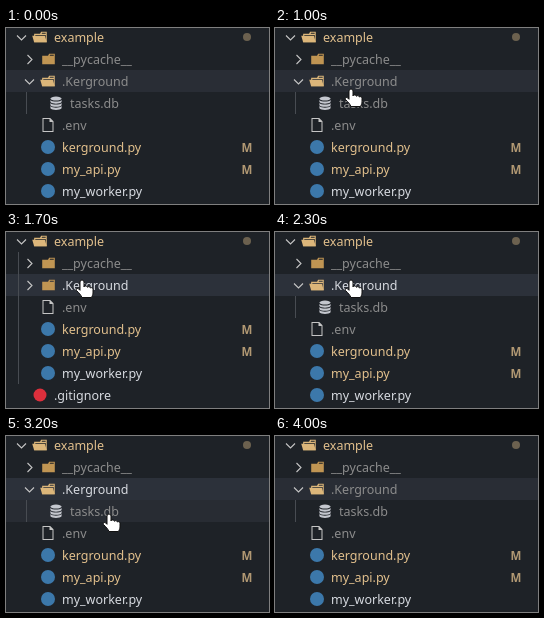
Write an HTML page that moves like this. It is 263 by 176 pixels and loops after 4.2 s.

```html
<!DOCTYPE html>
<html lang="en">
<head>
<meta charset="utf-8">
<title>File tree</title>
<style>
  html, body { margin: 0; width: 100%; height: 100%; overflow: hidden; background: #1e2227; }
  svg { display: block; width: 263px; height: 176px; }
  text { font: 12.5px "Noto Sans", "Open Sans", sans-serif; }
  .changed { fill: #e2c08d; }
  .ignored { fill: #8c8c8c; }
  .plain { fill: #d7dae0; }
  .badge { font-size: 11.5px; font-weight: 600; text-anchor: middle; opacity: .75; }
  .chevron { fill: none; stroke: #c5c5c5; stroke-width: 1.1; }
  .guide { fill: #484c52; }
</style>
</head>
<body>
<svg viewBox="0 0 263 176">
  <defs>
    <path id="right" class="chevron" d="M-1.5-4 3 .5-1.5 5"/>
    <path id="down" class="chevron" d="M-4-1.5 .5 3 5-1.5"/>
    <path id="folder" fill="#c09553" fill-rule="evenodd" transform="scale(.5)"
      d="M27.5 5.5H18.2L16.1 9.7H4.4V26.5H29.6V5.5Zm0 4.2H19.3l1.1-2.1h7.1Z"/>
    <g id="open" fill="#dcb67a" transform="scale(.5)">
      <path fill-rule="evenodd" d="M27.4 5.5H18.2L16.1 9.7H4.3V26.5H29.5V5.5Zm0 18.7H6.6V11.8H27.4Zm0-14.5H19.2l1-2.1h7.1Z"/>
      <path d="M25.7 13.7H.5L4.3 26.5H29.5Z"/>
    </g>
    <path id="file" fill="#c5c5c5" fill-rule="evenodd" transform="scale(.5)"
      d="M20.4 2H5V30H27V8.6ZM7 28V4H19v6h6V28Z"/>
    <g id="db" fill="#c4c7ce">
      <ellipse cx="8" cy="3.6" rx="5.6" ry="2"/>
      <path id="disc" d="M2.4 4.9C4 7 12 7 13.6 4.9V7.1C12 9.3 4 9.3 2.4 7.1Z"/>
      <use href="#disc" y="3.1"/>
      <use href="#disc" y="6.2"/>
    </g>
    <circle id="python" cx="8" cy="8" r="7" fill="#3c78aa"/>
    <circle id="git" cx="8" cy="8" r="6.5" fill="#dd2f3c"/>
  </defs>

  <rect id="selected" y="42" width="263" height="22"/>
  <rect id="hover" width="263" height="22" fill="#282c33"/>
  <rect id="outer" class="guide" x="12" y="20" width="1" height="132"/>
  <g id="top"></g>
  <g id="child"><rect class="guide" x="20" y="64" width="1" height="22"/></g>
  <g id="rest"></g>
  <circle cx="241" cy="9" r="4" fill="#e2c08d" opacity=".4"/>
  <path id="hand" fill="#fff" stroke="#111" stroke-linejoin="round"
    d="M-2 2a2 2 0 0 1 4 0V7c0-1.5 3-1.5 3.4.3.8-1.2 2.8-.8 3 .7 1-.8 2.6-.2 2.6 1.2V13c0 2-1 3-1.5 4.5H0c-1-2.5-3-4.5-5.5-7-.8-1.5 1-2.6 2-1.7L-2 10.3Z"/>
</svg>
<script>
  const $ = id => document.getElementById(id);
  const LOOP = 4200, STEP = 100, ROW = 22;

  function addRow(group, index, depth, icon, name, kind, extra = "") {
    const y = 9 + index * ROW, x = 26 + depth * 8;
    $(group).insertAdjacentHTML("beforeend",
      `<use href="#${icon}" x="${x}" y="${y - 8}"/>` +
      `<text class="${kind}" x="${x + 22}" y="${y + 5}">${name}</text>` + extra);
  }
  const arrow = (dir, x, y, id) => `<use id="${id}" href="#${dir}" x="${x}" y="${y}"/>`;
  const badge = y => `<text class="changed badge" x="241" y="${y}">M</text>`;

  addRow("top", 0, 0, "open", "example", "changed", arrow("down", 15, 9, "rootArrow"));
  addRow("top", 1, 1, "folder", "__pycache__", "ignored", arrow("right", 23, 31, "cacheArrow"));
  addRow("top", 2, 1, "open", ".Kerground", "ignored", arrow("down", 23, 53, "dirArrow"));
  addRow("child", 3, 2, "db", "tasks.db", "ignored");
  addRow("rest", 4, 1, "file", ".env", "ignored");
  addRow("rest", 5, 1, "python", "kerground.py", "changed", badge(124));
  addRow("rest", 6, 1, "python", "my_api.py", "changed", badge(146));
  addRow("rest", 7, 1, "python", "my_worker.py", "plain");
  addRow("rest", 8, 0, "git", ".gitignore", "plain");

  const dirArrow = $("dirArrow");
  const dirName = dirArrow.previousElementSibling;
  const dirIcon = dirName.previousElementSibling;

  // Pointer stops: time, x, y
  const path = [
    [500, 92, 176.6], [1000, 76, 61], [1200, 76, 48], [2500, 76, 48],
    [3100, 103, 80], [3200, 103, 78], [3500, 111, 6]
  ];

  function pointerAt(t) {
    const next = path.findIndex(p => p[0] >= t);
    if (next < 0 || t < path[0][0]) return null;
    if (next === 0) return path[0].slice(1);
    const a = path[next - 1], b = path[next];
    const u = (t - a[0]) / (b[0] - a[0]), k = u * u * (3 - 2 * u);
    return [a[1] + (b[1] - a[1]) * k, a[2] + (b[2] - a[2]) * k];
  }

  const show = (el, on) => el.setAttribute("visibility", on ? "visible" : "hidden");

  function draw(now) {
    const t = Math.floor(now % LOOP / STEP) * STEP;
    const focused = t >= 1500 && t < 4000;
    const closed = t >= 1700 && t < 2300;
    const pos = pointerAt(t);

    dirName.setAttribute("class", focused ? "plain" : "ignored");
    dirIcon.setAttribute("href", closed ? "#folder" : "#open");
    dirArrow.setAttribute("href", closed ? "#right" : "#down");
    $("selected").setAttribute("fill", focused ? "#2c313a" : "#292d35");
    $("rest").setAttribute("transform", `translate(0 ${closed ? -ROW : 0})`);
    show($("child"), !closed);
    show($("outer"), closed);

    const row = pos ? Math.floor((pos[1] - 1) / ROW) : 2;
    $("hover").setAttribute("y", row * ROW - 2);
    show($("hover"), row !== 2);
    show($("hand"), pos);
    if (pos) $("hand").setAttribute("transform", `translate(${pos})`);
    requestAnimationFrame(() => draw(performance.now() - start));
  }

  const start = performance.now();
  draw(0);
</script>
</body>
</html>
```
